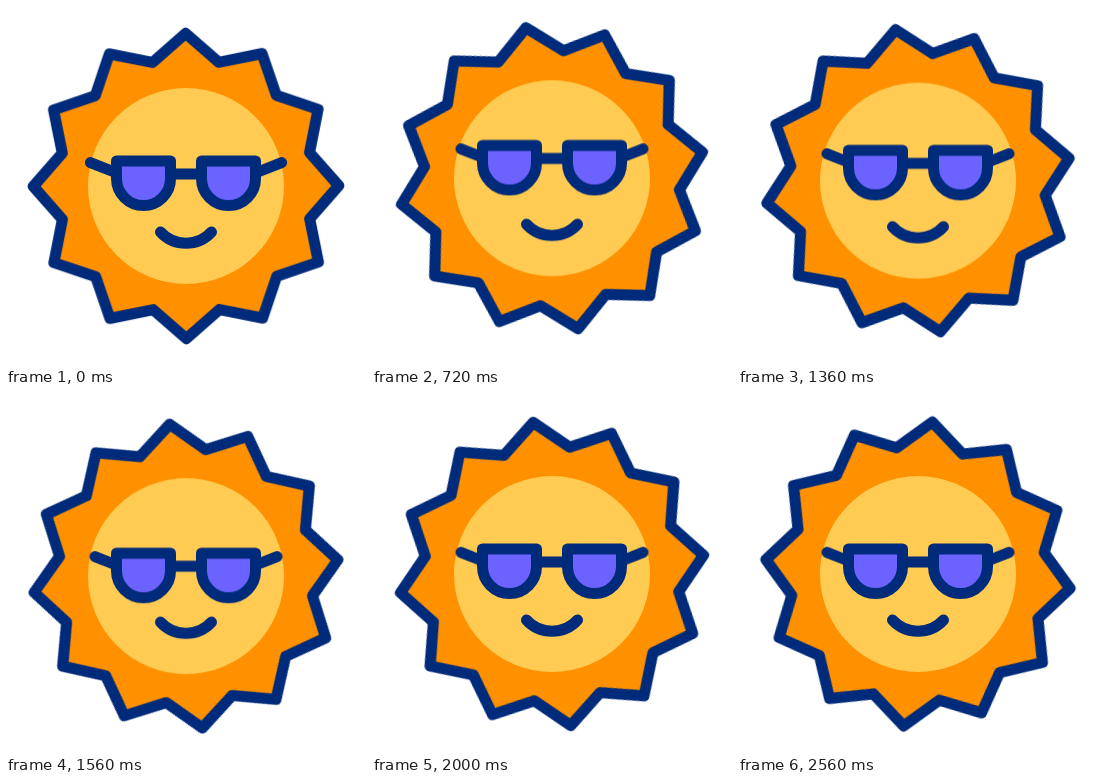
Write an HTML page that moves like this. It is 360 by 360 pixels and loops after 2600 ms.

```html
<!DOCTYPE html>
<html lang="en">
<head>
<meta charset="utf-8">
<title>Cool sun</title>
<style>
  html, body { margin: 0; width: 100%; height: 100%; overflow: hidden; background: #fff; }
  svg { display: block; width: 100vw; height: 100vh; }
  .line { stroke: #002a7a; stroke-width: 11; stroke-linecap: round; stroke-linejoin: round; fill: none; }
  .lens { fill: #6c63ff; }
  .rays { fill: #ff9100; transform-origin: 180px 180px; animation: spin 2600ms linear infinite; }
  .bob { animation: bob 2600ms cubic-bezier(.37, 0, .63, 1) infinite; }
  .arm { animation: tuck 2600ms cubic-bezier(.37, 0, .63, 1) infinite; }

  @keyframes spin { to { transform: rotate(-360deg); } }
  @keyframes bob {
    0% { transform: translateY(0); }
    12.82% { transform: translateY(11.7px); }
    25.64% { transform: translateY(-8.7px); }
    38.46% { transform: translateY(6px); }
    51.28% { transform: translateY(-5.9px); }
    57.69% { transform: translateY(3px); }
    64.1%, 100% { transform: translateY(0); }
  }
  @keyframes tuck {
    0% { transform: translate(0, 0); }
    12.82% { transform: translate(.8px, .3px); }
    25.64%, 100% { transform: translate(4.6px, 1.8px); }
  }
</style>
</head>
<body>
<svg viewBox="0 0 360 360">
  <g class="bob">
    <polygon id="rays" class="rays line"/>
    <circle cx="180" cy="180" r="98" fill="#ffcb52"/>
    <path class="line" d="M154.5 226C168 241 192 241 205.5 226"/>
    <!-- the glasses bob twice as far as the face -->
    <g class="bob line">
      <path d="M164.5 168H195.5"/>
      <g>
        <path class="arm" d="M84.4 156.6L107 165.5"/>
        <path class="lens" d="M110.5 155H164.5V172.5A27 27 0 0 1 110.5 172.5Z"/>
      </g>
      <g transform="translate(360) scale(-1 1)">
        <path class="arm" d="M84.4 156.6L107 165.5"/>
        <path class="lens" d="M110.5 155H164.5V172.5A27 27 0 0 1 110.5 172.5Z"/>
      </g>
    </g>
  </g>
</svg>
<script>
  const points = Array.from({ length: 24 }, (_, i) => {
    const a = i * Math.PI / 12, r = i % 2 ? 128 : 152.7;
    return [180 + r * Math.sin(a), 180 - r * Math.cos(a)].map(v => v.toFixed(2)).join();
  });
  document.getElementById('rays').setAttribute('points', points.join(' '));
</script>
</body>
</html>
```
